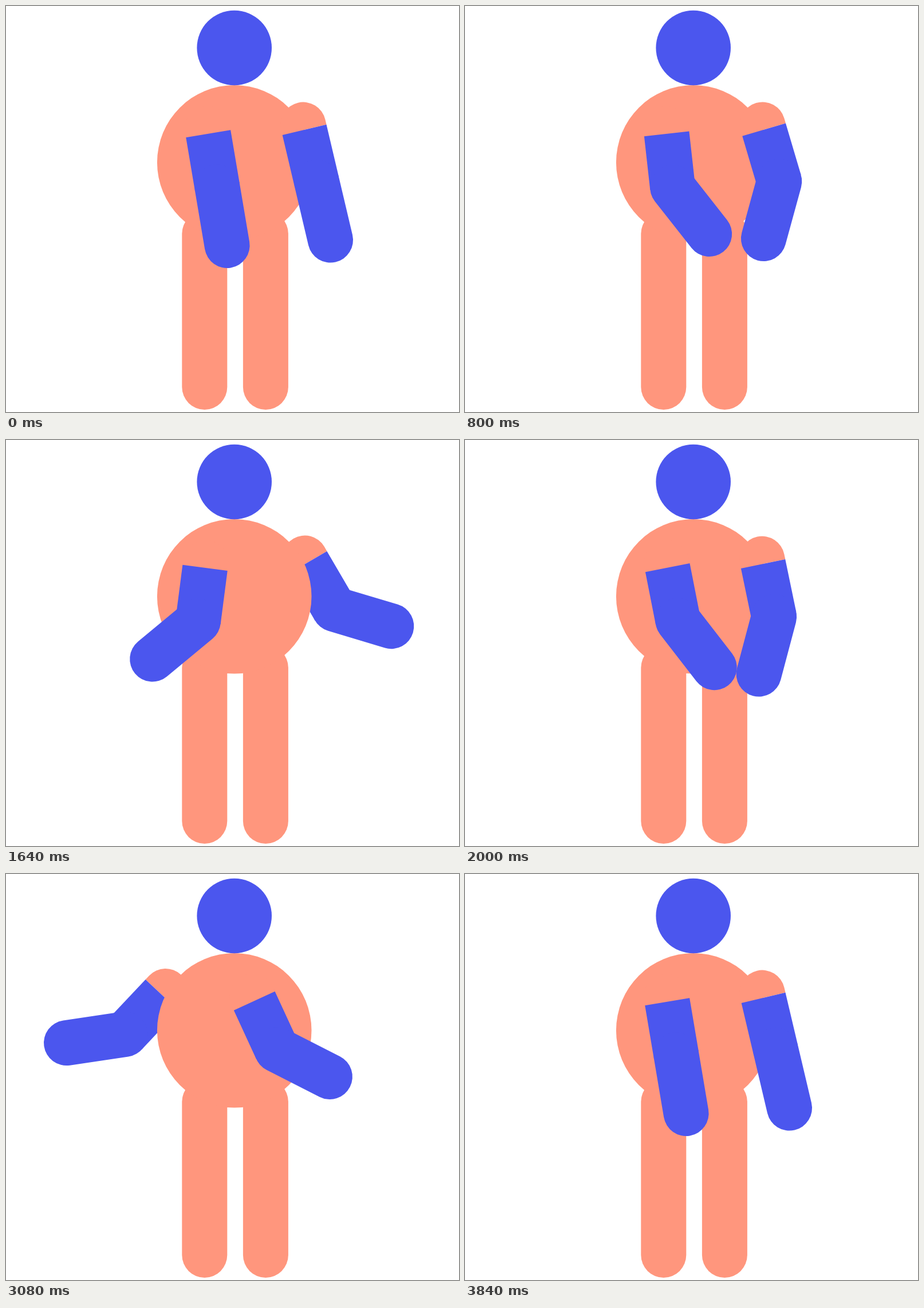
These frames come from a looping animation (791x708 px, 3.88 s). An HTML page with a canvas:

```html
<!DOCTYPE html>
<html lang="en">
<head>
<meta charset="utf-8">
<title>Arm swing</title>
<style>
  html, body { margin: 0; width: 100%; height: 100%; overflow: hidden; background: #fff; }
  canvas { display: block; }
</style>
</head>
<body>
<canvas id="stage" width="791" height="708"></canvas>
<script>
const ctx = document.getElementById('stage').getContext('2d');
const SKIN = '#ff967d', BLUE = '#4b56ee';
const STEP = 40, STEPS = 97;
const LIMB = 79, CAP = 10, SLEEVE = 19, ELBOW = 113, FOREARM = 103.5;

// [step, shoulder swing, elbow bend] in degrees
const keys = [
  [0, 0, 0], [10, 9.1, 98], [13, 6.8, 95.4], [22, -6.5, 12.5],
  [29, -18.4, -39.2], [35, -22.6, -67], [41, -17, -43], [48, -2, 6],
  [57, 9.3, 97], [61, 6.8, 95.4], [70, -6.5, 12.5], [77, -18.4, -38.3],
  [83, -22.6, -67], [89, -17, -43], [95, -3.2, -7], [96, 0, 0]
];

const slope = (i, c) => (keys[i + 1][c] - keys[i][c]) / (keys[i + 1][0] - keys[i][0]);

function tangent(i, c) {
  if (i === 0) return slope(0, c);
  if (i === keys.length - 1) return slope(i - 1, c);
  const before = keys[i][0] - keys[i - 1][0], after = keys[i + 1][0] - keys[i][0];
  return (slope(i - 1, c) * after + slope(i, c) * before) / (before + after);
}

// Smooth curve through the keys
function valueAt(step, c) {
  let i = 0;
  while (i < keys.length - 2 && step >= keys[i + 1][0]) i++;
  const span = keys[i + 1][0] - keys[i][0];
  const t = (step - keys[i][0]) / span, s = 1 - t;
  return keys[i][c] * s * s * (1 + 2 * t) + keys[i + 1][c] * t * t * (3 - 2 * t)
    + span * t * s * (tangent(i, c) * s - tangent(i + 1, c) * t);
}

function disc(x, y, r, color) {
  ctx.fillStyle = color;
  ctx.beginPath();
  ctx.arc(x, y, r, 0, 2 * Math.PI);
  ctx.fill();
}

function line(x1, y1, x2, y2, color, cap) {
  ctx.strokeStyle = color;
  ctx.lineWidth = LIMB;
  ctx.lineCap = cap;
  ctx.beginPath();
  ctx.moveTo(x1, y1);
  ctx.lineTo(x2, y2);
  ctx.stroke();
}

// Angles are measured from straight down, positive to the right
function arm(x, y, angle, bend) {
  const rad = Math.PI / 180;
  ctx.save();
  ctx.translate(x, y);
  ctx.rotate(-angle * rad);
  ctx.fillStyle = SKIN;
  ctx.beginPath();
  ctx.arc(0, CAP, LIMB / 2, Math.PI, 0);
  ctx.lineTo(LIMB / 2, SLEEVE);
  ctx.lineTo(-LIMB / 2, SLEEVE);
  ctx.fill();
  line(0, SLEEVE, 0, ELBOW, BLUE, 'butt');
  line(0, ELBOW, FOREARM * Math.sin(bend * rad), ELBOW + FOREARM * Math.cos(bend * rad), BLUE, 'round');
  ctx.restore();
}

function body() {
  line(346.8, 397, 346.8, 664.5, SKIN, 'round');
  line(453.4, 397, 453.4, 664.5, SKIN, 'round');
  disc(398.7, 272.7, 134.8, SKIN);
  disc(398.7, 73, 65.3, BLUE);
}

function draw(step) {
  const swing = valueAt(step, 1), bend = valueAt(step, 2);
  const turned = step >= 55 && step < 95;
  const farArm = () => turned
    ? arm(285.4, 197.2, swing - 24.9, bend)
    : arm(516.7, 197.4, 13.3 - swing, -bend);

  ctx.fillStyle = '#fff';
  ctx.fillRect(0, 0, 791, 708);
  if (bend < 0) farArm();
  body();
  if (bend >= 0) farArm();
  if (turned) arm(425.7, 204, 6.4 - swing, -bend);
  else arm(350, 204, 9.6 + swing, bend);
}

const start = performance.now();
function tick() {
  draw(Math.floor((performance.now() - start) / STEP) % STEPS);
  requestAnimationFrame(tick);
}
tick();
</script>
</body>
</html>
```
